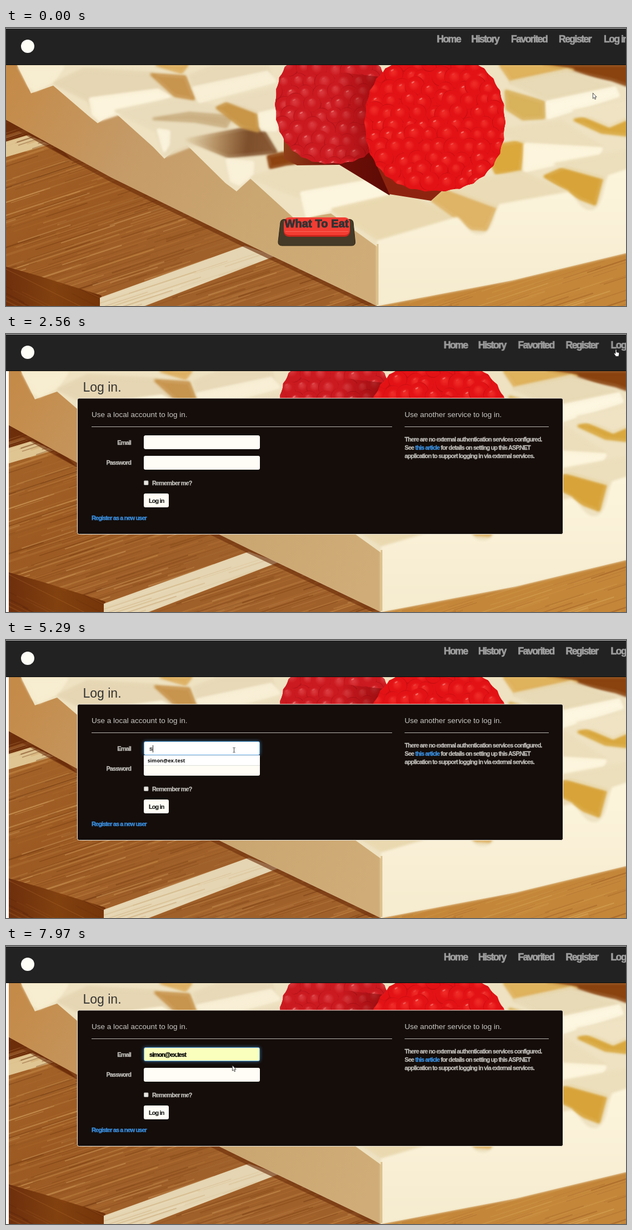
These frames come from a looping animation (1116 by 502 pixels, 8000 ms). An HTML page with a canvas:

```html
<!DOCTYPE html>
<html lang="en">
<head>
<meta charset="utf-8">
<title>Log in</title>
<style>
html, body { margin: 0; width: 100%; height: 100%; overflow: hidden; background: #fff; }
#stage { position: relative; width: 1116px; height: 502px; overflow: hidden; }
#stage > * { position: absolute; left: 0; top: 0; }
#photo { left: -10px; }
svg { display: block; overflow: visible; }
text, .heavy { font-family: "Liberation Sans", Arial, sans-serif; }
.heavy { font-weight: 700; font-size: 11px; letter-spacing: -.92px; -webkit-text-stroke: .3px; }
.nav { font-weight: 700; font-size: 17.5px; letter-spacing: -1.5px; fill: #9d9d9d; stroke: #9d9d9d; stroke-width: .7px; }
.label { fill: #bdbab6; stroke: #bdbab6; stroke-width: .3px; }
.link { fill: #3a8fe0; stroke: #3a8fe0; }
.head { font-size: 13.5px; fill: #cbc8c4; }
.box { fill: #fffdf5; }

/* every loop shares the 8 s clock and changes in hard steps */
#photo, #nav, #login, #home, #account, #cursor, #cursor path, #field, #caret, #menu, #strip {
  animation: 8s step-end infinite;
}
#photo { animation-name: shift-photo; }
#nav { animation-name: shift-nav; }
#login { animation-name: hover; }
#home { animation-name: first; }
#account, #strip { animation-name: second; }
@keyframes shift-photo { 0% { transform: none } 32%, 100% { transform: translateX(7px) } }
@keyframes shift-nav { 0% { transform: none } 32%, 100% { transform: translateX(12.5px) } }
@keyframes hover { 0%, 32%, 100% { fill: #9d9d9d; stroke: #9d9d9d } 15.125% { fill: #fff; stroke: #fff } }
@keyframes first { 0% { opacity: 1 } 32%, 100% { opacity: 0 } }
@keyframes second { 0% { opacity: 0 } 32%, 100% { opacity: 1 } }

#field {
  position: absolute; left: 248px; top: 183px; width: 209px; height: 25px; box-sizing: border-box;
  border: 1px solid #fffdf5; border-radius: 3px; padding-left: 9px; background: #fffdf5;
  line-height: 24px; white-space: pre; color: #555; animation-name: field;
}
@keyframes field {
  0% { background: #fffdf5; border-color: #fffdf5; box-shadow: 0 0 0 #66afe900 }
  52.5% { background: #fff; border-color: #fffdf5; box-shadow: 0 0 0 #66afe900; animation-timing-function: ease-out }
  54% { background: #fff; border-color: #66afe9; box-shadow: 0 0 6px #4a96d8b0; color: #555 }
  85.375%, 100% { background: #faffbd; border-color: #66afe9; box-shadow: 0 0 6px #4a96d8b0; color: #000 }
}
#caret { display: inline-block; width: 1px; height: 13px; margin-left: .6px; vertical-align: -3px; background: #222; animation-name: caret; }
@keyframes caret {
  0%, 59.125%, 81.875%, 94.625%, 100% { opacity: 0 }
  52.5%, 66.125%, 89.25% { opacity: 1 }
}
#menu {
  position: absolute; left: 248px; top: 208px; width: 209px; height: 19px; box-sizing: border-box;
  padding-left: 7px; background: #fff; border: solid #ddd; border-width: 1px 0;
  font: 700 9.2px/17px "Open Sans", "Noto Sans", sans-serif; color: #111; animation-name: menu;
}
@keyframes menu {
  0%, 89.25%, 100% { opacity: 0; background: #fff }
  66.125% { opacity: 1; background: #fff }
  85.375% { opacity: 1; background: #cdcdcd }
}

#cursor { animation-name: move; }
@keyframes move {
  0% { transform: translate(1056px, 117px) }
  1.5% { transform: translate(1058px, 113px) }
  3% { transform: translate(1062px, 105px) }
  4.5% { transform: translate(1067px, 94px) }
  6% { transform: translate(1073px, 81px) }
  7.5% { transform: translate(1080px, 68px) }
  9.25% { transform: translate(1087px, 55px) }
  11.25% { transform: translate(1092px, 45px) }
  13.25% { transform: translate(1094px, 39px) }
  15.125% { transform: translate(1094px, 30px) }
  16.625% { transform: translate(1094px, 29px) }
  20.125% { transform: translate(1094px, 28px) }
  25.5% { transform: translate(1094px, 27px) }
  35.125% { transform: translate(1060px, 52px) }
  36.5% { transform: translate(960px, 80px) }
  37.9% { transform: translate(810px, 112px) }
  39.25% { transform: translate(660px, 140px) }
  40.6% { transform: translate(540px, 156px) }
  41.875% { transform: translate(450px, 163px) }
  43.75% { transform: translate(440px, 172px) }
  45.25% { transform: translate(430px, 181px) }
  46.75% { transform: translate(422px, 190px) }
  48.25% { transform: translate(414px, 193px) }
  49.75% { transform: translate(408px, 194px) }
  98.125% { transform: translate(408px, 203px) }
  99.625%, 100% { transform: translate(407px, 215px) }
}
#cursor path { stroke: #222; stroke-width: .8px; fill: #fff; }
#cursor #arrow { animation-name: arrow; }
#cursor #hand { animation-name: hand; }
#cursor #beam { animation-name: beam; fill: none; stroke: #444; stroke-width: 1px; }
@keyframes arrow { 0%, 35.125%, 99.625%, 100% { opacity: 1 } 15.125%, 46.75% { opacity: 0 } }
@keyframes hand { 0%, 35.125%, 100% { opacity: 0 } 15.125% { opacity: 1 } }
@keyframes beam { 0%, 99.625%, 100% { opacity: 0 } 46.75% { opacity: 1 } }
</style>
</head>
<body>
<div id="stage">
  <canvas id="photo" width="1136" height="502"></canvas>
  <div id="strip" style="width:5px;height:502px;background:#fff"></div>

  <svg width="1116" height="502">
    <rect width="1116" height="67" fill="#222"/>
    <rect width="1116" height="1" fill="#c4c4c4"/>
    <rect y="66" width="1116" height="1" fill="#0c0c0c"/>
    <circle cx="39" cy="33" r="12" fill="#fefdf6"/>
    <g id="nav" class="nav">
      <text x="775.500" y="26">Home</text>
      <text x="837.500" y="26">History</text>
      <text x="909" y="26">Favorited</text>
      <text x="995" y="26">Register</text>
      <text x="1076" y="26" id="login">Log in</text>
    </g>
    <g id="home">
      <path d="M501 345.500H618Q624 345.500 625 351L628.500 386Q629 393 622 393H497Q489.500 393 490 386L494 351Q495 345.500 501 345.500Z" fill="#453a27" stroke="#2c2416"/>
      <rect x="500" y="343" width="119" height="34" rx="9" fill="#c9251c"/>
      <rect x="500" y="342" width="119" height="32" rx="9" fill="#f23c32"/>
      <path d="M503 367.500H616" stroke="#f9675c"/>
      <text x="501.500" y="360" font-size="20" font-weight="700" letter-spacing=".1" fill="#333" stroke="#333" stroke-width="1">What To Eat</text>
    </g>
  </svg>

  <div id="account">
    <svg width="1116" height="502">
      <text x="138.500" y="104" font-size="23" fill="#333">Log in.</text>
      <rect x="128.500" y="116" width="874" height="245.500" rx="3" fill="#140d0a" stroke="#eeeae0"/>
      <text class="head" x="154" y="150">Use a local account to log in.</text>
      <text class="head" x="717.500" y="150">Use another service to log in.</text>
      <path d="M154 167.500H695M717.500 167.500H977" stroke="#b9b6b0"/>
      <g class="heavy label">
        <text x="225" y="200" text-anchor="end">Email</text>
        <text x="225" y="236" text-anchor="end">Password</text>
        <text x="263" y="273">Remember me?</text>
        <text x="717.500" y="194">There are no external authentication services configured.</text>
        <text x="717.500" y="209">See <tspan class="link">this article</tspan> for details on setting up this ASP.NET</text>
        <text x="717.500" y="224">application to support logging in via external services.</text>
        <text x="154" y="336" class="link">Register as a new user</text>
      </g>
      <rect class="box" x="248" y="220" width="209" height="25" rx="3"/>
      <rect x="248.500" y="265" width="7.500" height="7.500" rx="1" fill="#e8e6e0" stroke="#aaa"/>
      <rect class="box" x="248" y="288" width="45" height="25" rx="3"/>
      <text class="heavy" x="257" y="304.500" fill="#222" stroke="#222" stroke-width=".2">Log in</text>
    </svg>
    <div id="field" class="heavy"><span id="typed"></span><i id="caret"></i></div>
    <div id="menu">simon@ex.test</div>
  </div>

  <svg id="cursor" width="12" height="16">
    <path id="arrow" d="M.4 .4V10.400L2.600 8.300 4.100 11.800 5.700 11.100 4.200 7.700H7.100Z"/>
    <path id="hand" d="M3 1.500Q4 .2 5 1.500V5.800L8.500 6.500Q10 7 9.600 9.500L8.600 13.500H3.800L.7 9Q0 7 1.500 7.300L3 8.500Z"/>
    <path id="beam" d="M.5 .5H2L2.500 1 3 .5H4.500M2.500 1V8.500M.5 9H2L2.500 8.500 3 9H4.500"/>
  </svg>
</div>

<script>
const ctx = document.getElementById('photo').getContext('2d');
ctx.translate(10, 0);
ctx.lineJoin = 'round';

let seed = 7;
const rnd = () => (seed = (seed * 16807) % 2147483647) / 2147483647;
const between = (a, b) => a + rnd() * (b - a);
const shape = (fill, d) => { ctx.fillStyle = fill; ctx.fill(new Path2D(d)); };
const line = (color, width, d) => {
  ctx.strokeStyle = color;
  ctx.lineWidth = width;
  ctx.stroke(new Path2D(d));
};
// filled shape with rounded corners
const block = (fill, d) => { shape(fill, d); line(fill, 5, d); };
function ramp(x0, y0, x1, y1, ...colors) {
  const g = ctx.createLinearGradient(x0, y0, x1, y1);
  colors.forEach((c, i) => g.addColorStop(i / (colors.length - 1), c));
  return g;
}

// straight wood grain inside a clip path
function grain(d, count, slope, colors) {
  ctx.save();
  ctx.clip(new Path2D(d));
  for (let i = 0; i < count; i++) {
    const x = between(-80, 1100), y = between(160, 640), len = between(40, 200);
    ctx.globalAlpha = between(.12, .45);
    line(colors[Math.floor(rnd() * colors.length)], between(.6, 2.6), `M${x} ${y}l${len} ${len * slope}`);
  }
  ctx.restore();
}

function wood() {
  shape(ramp(0, 180, 200, 502, '#a5652a', '#9c5a22', '#a0602a'), 'M-10 67H1126V502H-10Z');
  shape('#6d2e0a', 'M-10 160L90 208 120 240 60 205 -10 212Z');
  shape('#dfc592', 'M-10 208L40 193 78 210 -10 236Z');
  shape('#c4873a', 'M640 502L910 456 1126 400V502Z');
  grain('M-10 160L670 502H-10Z', 1300, -.33, ['#c98f4c', '#b67636', '#7c4012', '#6b330c', '#dcae6c']);
  grain('M640 502L910 456 1126 400V502Z', 700, -.33, ['#e2b668', '#d39a48', '#a8662a', '#94521c']);
  shape(ramp(0, 0, 170, 0, '#6e2f0c', '#82410f', '#753509'), 'M-10 428L60 448 172 483 170 502H-10Z');
  grain('M-10 428L172 483V502H-10Z', 500, .5, ['#9a5520', '#55230a', '#b06c30']);
  shape('#e5d5b2', 'M169 487L430 393 484 412 250 502H169Z');
  grain('M169 487L430 393 484 412 250 502H169Z', 600, -.33, ['#c9a873', '#f2e6c9', '#b98c55']);
  line('#6d2e0aa0', 10, 'M-10 162L80 213 190 273 430 391 668 504');
}

function chocolate() {
  shape('#eee2c2', 'M-10 67V160L190 270 430 388 668 502 910 456 1126 404V67Z');
  shape(ramp(0, 100, 640, 460, '#c48a48', '#c59a66', '#caa671', '#d0ad78'),
    'M-10 67V160L80 210 190 270 430 388 560 450 668 502V395L585 335 520 345 440 272 415 295 395 280 320 206 285 236 265 215 195 152 165 172 150 160 85 104 45 118 20 67Z');
  ctx.save();
  ctx.filter = 'blur(2px)';
  // left row of blocks: top, then lit edge
  block('#f7edd0', 'M24 70H103L85 96 52 112 42 104Z');
  block('#e6d6b3', 'M88 100L140 75 263 82 294 120 165 164 148 130Z');
  block('#fcf4dc', 'M152 128L273 112 294 124 168 166 157 155Z');
  block('#e9dcbc', 'M198 150L310 127 375 142 412 165 395 188 288 230 272 186Z');
  block('#cbb083', 'M266 164L330 154 406 160 396 178 340 168Z');
  block('#fbf3dc', 'M274 184L293 187 292 210 285 222Z');
  block(ramp(325, 195, 490, 215, '#e2d2ac', '#b48f62', '#7e4f2b', '#8a5a35'), 'M326 202L430 182 462 184 486 224 400 232Z');
  block('#8e4310', 'M472 232L500 226 520 244 476 252Z');
  block('#faf1d9', 'M398 238L444 243 443 264 420 282 406 276Z');
  // upper middle blocks
  block('#c8954e', 'M262 84L322 88 338 128 304 122Z');
  block('#ddb062', 'M272 67H326L316 80Z');
  block('#e8d9b8', 'M332 86L380 67H470L474 82 338 108Z');
  block('#f8efd6', 'M338 108L470 80 484 96 348 133Z');
  block('#c99647', 'M380 144L400 135 450 150 454 186 424 178Z');
  block('#eadcbd', 'M396 130L484 110V148L455 153Z');
  block('#faf2da', 'M456 155L486 148V184H460Z');
  // front blocks
  block('#ebddba', 'M444 270L505 252 600 248 686 300 530 304 500 294Z');
  block('#fdf6df', 'M532 298L655 276 688 302 590 326 542 341Z');
  block('#ead9b0', 'M588 328L712 299 826 348 670 381Z');
  // right-hand blocks
  block('#8a430f', 'M968 67H1126V106L1090 93Z');
  block('#dfb25c', 'M890 67H966L1020 76 910 96Z');
  block('#d9b25c', 'M900 114L968 134V162L930 164 902 146Z');
  block('#e8dab6', 'M908 98L1010 76 1094 106 974 130Z');
  block('#fdf6e0', 'M974 134L1096 108 1102 122 976 162Z');
  block('#d9a83f', 'M1024 166L1126 150V194L1072 188Z');
  block('#efe3c4', 'M1022 150L1126 134V160L1086 177Z');
  block('#dba83c', 'M862 216L932 204 924 260 882 262Z');
  block('#ecdebb', 'M884 186L1000 169 1072 216 932 206Z');
  block('#fdf5dd', 'M934 210L1072 218 1066 228 934 258Z');
  block('#d8a43a', 'M970 268L1020 246 1076 258 1060 318 1034 308Z');
  block('#ecdfbc', 'M989 246L1126 221V259L1078 271Z');
  block('#dfb467', 'M768 312L792 288 886 312 864 364 838 362Z');
  block('#ebdcb7', 'M789 288L925 260 1010 296 884 323Z');
  shape(ramp(0, 260, 0, 480, '#fcf5dc', '#f9f0d7', '#f6ecd0'),
    'M668 502V384L812 341C828 352 830 373 852 373 878 373 878 335 888 318L1012 296C1026 306 1034 329 1052 329 1074 328 1074 290 1084 266L1126 252V404L910 456Z');
  ctx.restore();
  line('#dcc089', 3, 'M669 390V500');
}

// overlapping drupelets, packed in loose rows and clipped to a squarish oval
function berry(cx, cy, rx, ry, [light, mid, dark]) {
  const gap = 27;
  ctx.save();
  ctx.beginPath();
  for (let a = 0; a < 6.28; a += .02) {
    const bump = 1 - .018 * Math.abs(Math.sin(a * 15));
    const round = v => Math.sign(v) * Math.abs(v) ** .88;
    ctx.lineTo(cx + rx * bump * round(Math.cos(a)), cy + ry * bump * round(Math.sin(a)));
  }
  ctx.clip();
  ctx.fillStyle = mid;
  ctx.fillRect(cx - rx, cy - ry, rx * 2, ry * 2);
  let odd = 0;
  for (let y = cy - ry; y <= cy + ry; y += gap * .8, odd ^= 1) {
    for (let x = cx - rx - odd * gap / 2; x <= cx + rx + gap; x += gap) {
      const px = x + between(-6, 6), py = y + between(-5, 5), r = between(15, 20);
      const g = ctx.createRadialGradient(px - 2, py - 4, 2, px, py, r);
      g.addColorStop(0, light);
      g.addColorStop(.5, mid);
      g.addColorStop(.88, mid);
      g.addColorStop(1, dark);
      ctx.fillStyle = g;
      ctx.beginPath();
      ctx.ellipse(px, py, r, r * .92, between(0, 3), 0, 7);
      ctx.fill();
      ctx.fillStyle = '#f5a098';
      ctx.globalAlpha = between(0, .6);
      ctx.beginPath();
      ctx.ellipse(px - 3, py - 7, 3, 1.3, -.5, 0, 7);
      ctx.fill();
      ctx.globalAlpha = 1;
    }
  }
  ctx.restore();
}

wood();
chocolate();
shape(ramp(490, 240, 690, 270, '#93431a', '#711008', '#5c0a05'), 'M500 236L524 248 600 247 690 302 720 240 640 190 500 190Z');
shape('#8e2410', 'M668 250L690 300 765 312 800 280 720 240Z');
berry(588, 138, 104, 108, ['#d8383c', '#cb1a20', '#a40f14']);
shape(ramp(590, 0, 690, 0, '#80000000', '#6a0404a0'), 'M600 80L690 90 660 236 590 236Z');
berry(772, 170, 127, 126, ['#ee2a26', '#e31215', '#bd0b0e']);

const email = 'simon@ex.test';
const keys = [[5290, 1], [5430, 2], [5570, 3], [5710, 4], [5990, 5], [6830, email.length]];
const typed = document.getElementById('typed');
let start;
function tick(now) {
  start ??= now;
  const t = (now - start) % 8000;
  const count = keys.reduce((n, [at, size]) => t >= at ? size : n, 0);
  typed.textContent = email.slice(0, count);
  requestAnimationFrame(tick);
}
requestAnimationFrame(tick);
</script>
</body>
</html>
```
